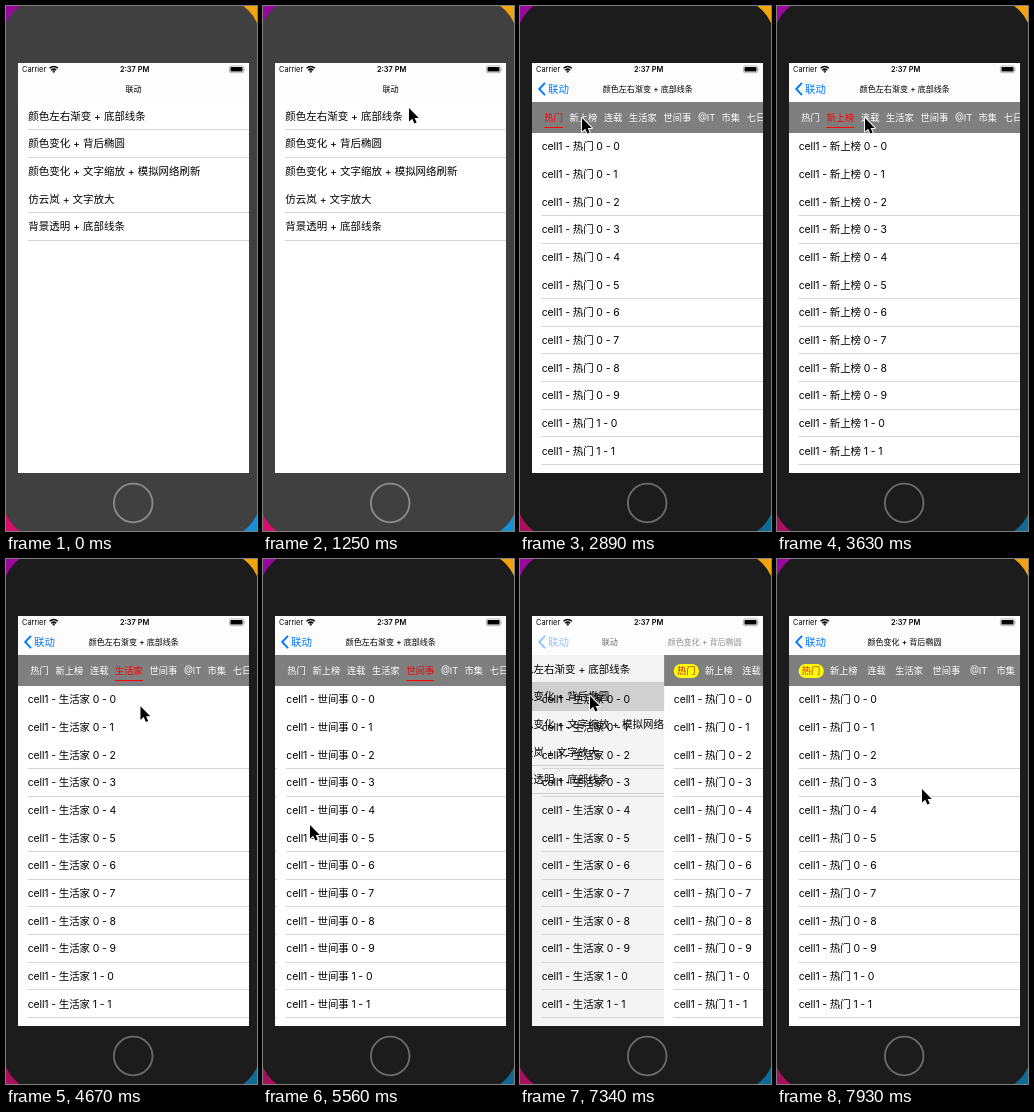
An HTML page for the animation above (8000 ms loop, 251 by 525 pixels).

```html
<!DOCTYPE html>
<html lang="zh-CN">
<head>
<meta charset="utf-8">
<title>联动</title>
<style>
  html, body { margin: 0; width: 100%; height: 100%; overflow: hidden; background: #1c1c1c; }
  svg { display: block; width: 100vw; height: 100vh; font-family: Inter, "Noto Sans CJK SC", "Noto Sans CJK", sans-serif; }
  .row { font-size: 10.47px; fill: #000; }
  .cell { letter-spacing: -.12px; }
  .line { fill: #d6d6d9; }
  .title { font-size: 8.05px; font-weight: 500; text-anchor: middle; }
  .tab { font-size: 9.24px; }
  .status { font-size: 7.4px; }
  #bezel { fill: #404040; }
  #home { stroke: #8c8c8c; }
  #pink { fill: #d80d6c; }
  #blue { fill: #1590d6; }
  .active #bezel { fill: #1c1c1c; }
  .active #home { stroke: #6c6c6c; }
  .active #pink { fill: #a80f5c; }
  .active #blue { fill: #106a94; }
</style>
</head>
<body>
<svg id="stage" viewBox="0 0 251 525" preserveAspectRatio="none">
  <defs>
    <clipPath id="screen"><rect x="12" y="57" width="231" height="410"/></clipPath>
    <clipPath id="body"><rect x="12" y="96" width="231" height="371"/></clipPath>
    <clipPath id="lit"><rect id="litOld" y="97" height="24"/><rect id="litNew" y="97" height="24"/></clipPath>
  </defs>
  <rect width="126" height="263" fill="#98089c"/>
  <rect x="125" width="126" height="263" fill="#f2a40c"/>
  <rect id="pink" y="262" width="126" height="263"/>
  <rect id="blue" x="125" y="262" width="126" height="263"/>
  <rect id="bezel" x="-3.5" y="-7.5" width="258" height="540" rx="41"/>
  <circle id="home" cx="127.2" cy="497" r="19.3" fill="none" stroke-width="1.8"/>

  <g clip-path="url(#screen)">
    <rect x="12" y="57" width="231" height="410" fill="#fff"/>
    <g clip-path="url(#body)">
      <g id="list"></g>
      <rect id="dim" x="12" y="96" width="231" height="371"/>
      <g id="detail0"></g>
      <g id="detail1"></g>
    </g>
    <rect x="12" y="57" width="231" height="39" fill="#fdfdfd"/>
    <text id="homeTitle" class="title" x="127.5" y="86.4">联动</text>
    <text id="title0" class="title" x="127.8" y="86.4">颜色左右渐变 + 底部线条</text>
    <text id="title1" class="title" x="127.5" y="86.4">颜色变化 + 背后椭圆</text>
    <g id="back">
      <path d="M25 76.8L19.2 83L25 89.2" fill="none" stroke="#007aff" stroke-width="1.9"/>
      <text x="28" y="86.7" font-size="10.47" fill="#007aff">联动</text>
    </g>
    <text class="status" x="16" y="66">Carrier</text>
    <g fill="none" stroke="#000" stroke-width="1.5">
      <path d="M43.5 62.3Q47.7 58.6 51.9 62.3M45.2 64.2Q47.7 62 50.2 64.2"/>
      <circle cx="47.7" cy="65.5" r=".4"/>
    </g>
    <text class="status" x="128.6" y="66" font-weight="600" text-anchor="middle">2:37 PM</text>
    <rect x="223.4" y="59.9" width="14.2" height="6.8" rx="1.6" fill="none" stroke="#888" stroke-width=".6"/>
    <rect x="224.5" y="61" width="12" height="4.6" rx=".7"/>
    <path d="M238.4 62V64.7Q239.6 63.4 238.4 62" fill="#888"/>
  </g>

  <path id="cursor" d="M0 0V13.6L3.2 10.7L5.4 15.6L7.7 14.6L5.6 9.9H9.8Z"
        stroke="#fff" stroke-width="2" paint-order="stroke" stroke-linejoin="round"/>
</svg>

<script>
const LOOP = 8000, STEP = 148.5, WIDTH = 231, PITCH = 27.67;
const $ = id => document.getElementById(id);
const set = (id, attrs) => {
  for (const key in attrs) $(id).setAttribute(key, attrs[key]);
};
const shift = (id, x, y = 0) => set(id, { transform: `translate(${x} ${y})` });

const demos = ['颜色左右渐变 + 底部线条', '颜色变化 + 背后椭圆', '颜色变化 + 文字缩放 + 模拟网络刷新',
  '仿云岚 + 文字放大', '背景透明 + 底部线条'];
const tabs = ['热门', '新上榜', '连载', '生活家', '世间事', '@IT', '市集', '七日'];
const pages = tabs.slice(0, 5);
const tabWidth = name => name === '@IT' ? 17 : name.length * 9.24;

// Left edges of tabs set side by side.
const layout = (x, gap) => tabs.map(name => {
  const left = x;
  x += tabWidth(name) + gap;
  return left;
});
const tabX = layout(24.3, 6.7), pillTabX = layout(24.8, 9.6);

// Rows with hairlines; some hairlines are lost at this scale.
const rows = (labels, x, top, missing, cls = '') => labels.map((label, i) => {
  const y = top + i * PITCH;
  return `<text class="row ${cls}" x="${x}" y="${y}">${label}</text>` + (missing.includes(i) ? '' :
    `<rect class="line" x="${x - .3}" y="${Math.round(y + 9.5)}" width="222" height="1"/>`);
}).join('');

const cells = name => rows(Array.from({ length: 12 },
  (_, i) => `cell1 - ${name} ${Math.floor(i / 10)} - ${i % 10}`), 21.7, 144.2, [0, 1, 4], 'cell');

const tabRow = (xs, fill, from = 0) => tabs.slice(from).map((name, i) =>
  `<text class="tab" x="${xs[i + from]}" y="115.4" fill="${fill}">${name}</text>`).join('');

const panel = (height, fill) => `<rect x="12" y="96" width="231" height="${height}" fill="${fill}"/>`;
const paper = panel(371, '#fff'), bar = panel(31, '#7f7f7f');

$('list').innerHTML = paper +
  '<rect id="pressed" x="12" width="231" height="27.6" fill="#d9d9d9"/>' + rows(demos, 22.3, 113.7, [2]);
$('detail0').innerHTML = paper +
  pages.map((name, i) => `<g id="page${i}">${cells(name)}</g>`).join('') + bar +
  tabRow(tabX, '#fff') + `<g clip-path="url(#lit)">${bar}${tabRow(tabX, '#f00')}</g>` +
  '<rect id="underline" y="121" height="1" fill="#f00"/>';
$('detail1').innerHTML = paper + cells(tabs[0]) + bar +
  '<rect x="21.6" y="105" width="25.2" height="14" rx="7" fill="#ff0"/>' +
  `<text class="tab" x="24.8" y="115.4" fill="#d02000">${tabs[0]}</text>` + tabRow(pillTabX, '#fff', 1);

const mix = (a, b, k) => a + (b - a) * k;

// Critically damped spring, 0 to 1.
const settle = ms => {
  const u = Math.max(0, ms) * 0.018;
  return 1 - (1 + u) * Math.exp(-u);
};

// Pointer stops: [arrival, x, y].
const stops = [
  [500, 175, 273], [1240, 146, 102], [1980, 138, 185], [2850, 62, 112], [3610, 88, 112], [4250, 119, 113],
  [4970, 188, 266], [5550, 47, 266], [6150, 37, 81], [6580, 53, 108], [6900, 70, 137], [7920, 145, 230]
];
function pointer(t) {
  const i = stops.findIndex(stop => stop[0] > t);
  if (i < 1) return stops[i < 0 ? stops.length - 1 : 0].slice(1);
  const [start, x0, y0] = stops[i - 1], [end, x1, y1] = stops[i];
  const duration = Math.min(450, end - start);
  const k = Math.max(0, 1 - (end - t) / duration);
  const eased = k * k * (3 - 2 * k);
  return [mix(x0, x1, eased), mix(y0, y1, eased)];
}

// Three taps switch at once, then a swipe slides to the fifth tab.
const taps = [2950, 3950, 4400], SWIPE = 5160;
const tabAt = t => taps.filter(tap => tap <= t).length + settle(t - SWIPE);

function showTab(s) {
  const from = Math.floor(s), to = Math.min(from + 1, 4), k = s - from;
  const wFrom = tabWidth(tabs[from]), wTo = tabWidth(tabs[to]);
  set('litOld', { x: tabX[from] + k * wFrom, width: (1 - k) * wFrom });
  set('litNew', { x: tabX[to], width: k * wTo });
  set('underline', { x: mix(tabX[from], tabX[to], k), width: mix(wFrom, wTo, k) });
  pages.forEach((_, i) => {
    shift('page' + i, (i - s) * WIDTH);
    set('page' + i, { visibility: Math.abs(i - s) < 1 ? 'visible' : 'hidden' });
  });
}

function render(time) {
  const t = 500 + Math.floor((time - 500) / STEP) * STEP;
  $('stage').classList.toggle('active', t > 1500);

  const push = [settle(t - 1580) - settle(t - 6220), settle(t - 7250)];
  const depth = Math.max(...push);
  push.forEach((p, i) => {
    shift('detail' + i, (1 - p) * WIDTH);
    shift('title' + i, (1 - p) * 100);
    set('title' + i, { opacity: p });
  });
  shift('list', -0.3 * WIDTH * depth);
  shift('homeTitle', -88 * depth);
  set('homeTitle', { opacity: 1 - depth });
  set('back', { opacity: depth });
  set('dim', { opacity: depth * 0.1 });

  const second = t > 7150;
  set('pressed', { y: second ? 124 : 96.4, opacity: second || (t > 1500 && t < 2150) ? 1 : 0 });
  showTab(tabAt(t));

  set('cursor', { visibility: t >= 500 ? 'visible' : 'hidden' });
  shift('cursor', ...pointer(t));
}

function tick() {
  render(performance.now() % LOOP);
  requestAnimationFrame(tick);
}
tick();
</script>
</body>
</html>
```
